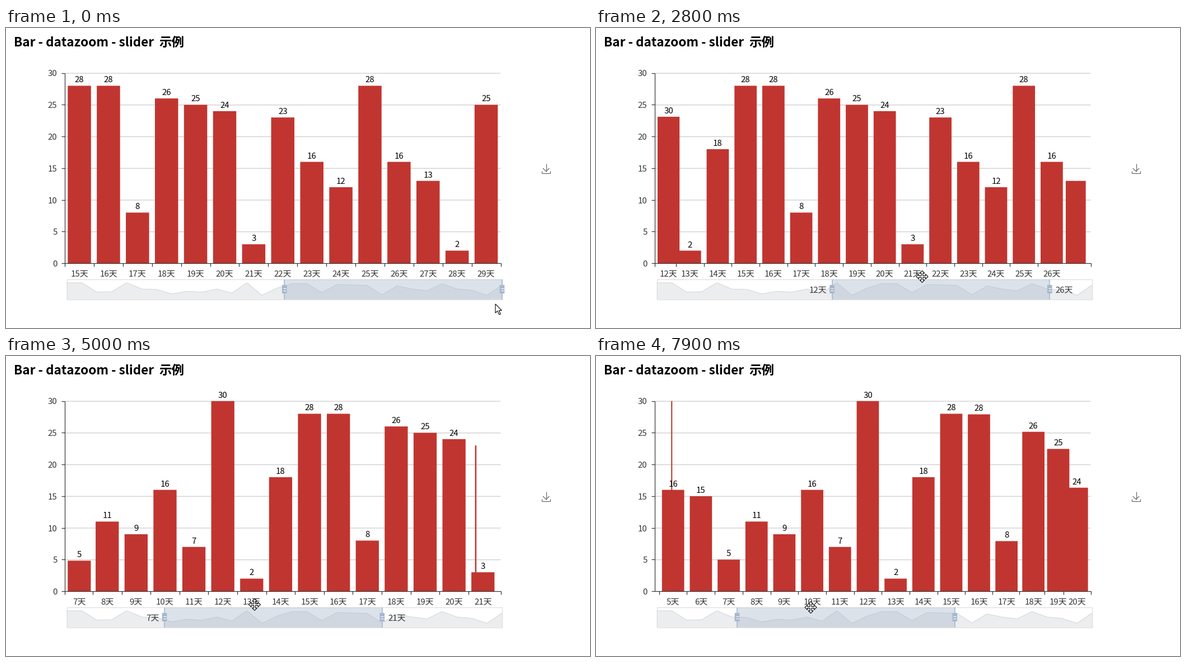
A matplotlib script for the animation above (8 s loop, 1043 px wide and 537 px high).

```python
import numpy as np
import matplotlib.pyplot as plt
from matplotlib.animation import FuncAnimation
from matplotlib.patches import Polygon, Rectangle

W, H, DPI = 1043, 537, 100
STEP, FRAMES = 100, 80
CJK = "Noto Sans CJK JP"
DARK, RED, HANDLE = "#333333", "#c13530", "#a7b7cc"

VALUES = [30, 30, 9, 10, 30, 16, 15, 5, 11, 9, 16, 7, 30, 2, 18,
          28, 28, 8, 26, 25, 24, 3, 23, 16, 12, 28, 16, 13, 2, 25]
LAST = len(VALUES) - 1
X0, X1, Y0, UNIT = 105.1, 883.5, 421.2, 11.35       # plot area
S0, S1, S_TOP, S_BOTTOM = 108.5, 886, 449.5, 485.5  # slider
SPAN = (S1 - S0) / 2
TWEEN = 300

# Key points of the drag: time in ms, left edge of the zoom window in px.
DRAG_T = [1800, 2200, 2600, 2800, 3900, 4200, 5000, 6200, 6950, 7250, 7750, 7900]
DRAG_X = [S0 + SPAN, 455.5, 443, 421.5, 365, 339, 283, 186, S0, S0, 241, 252]
# The chart follows the slider at a throttled rate, anew in each burst.
UPDATES = np.concatenate([np.arange(1910, 4400, 110),
                          np.arange(4420, 6000, 100),
                          np.arange(6095, 7900, 95)])


def slider_left(t):
    return np.interp(t, DRAG_T, DRAG_X)


def window(t):
    start = (slider_left(t) - S0) / (S1 - S0) * LAST
    return int(start + 0.5), int(start + LAST / 2 + 0.5)


def layout(first, last):
    """Category -> (centre, band width, value) at rest."""
    band = (X1 - X0) / (last - first + 1)
    return {i: np.array([X0 + (i - first + 0.5) * band, band, VALUES[i]])
            for i in range(first, last + 1)}


def cubic_out(p):
    return 1 - (1 - min(max(p, 0), 1)) ** 3


def blend(begin, goal, elapsed):
    p = cubic_out(elapsed / TWEEN)
    return {i: begin[i] + p * (goal[i] - begin[i]) for i in goal}


def chart_state(t):
    """Bars at time t, the removed bars still shrinking, and the window."""
    span = (LAST // 2 + 1, LAST)
    begin = goal = layout(*span)
    since, leaving = 0, []
    for u in UPDATES[UPDATES <= t]:
        now = blend(begin, goal, u - since)
        span, since = window(u), u
        goal = layout(*span)
        leaving += [(u, now[i]) for i in now if i not in goal]
        begin = {i: now.get(i, goal[i] * (1, 1, 0)) for i in goal}
    shrinking = []
    for u, (centre, band, value) in leaving:
        width = 0.8 * band * (1 - cubic_out((t - u) / TWEEN))
        if width > 0.02:
            shrinking.append((centre - 0.4 * band, width, value))
    return blend(begin, goal, t - since), shrinking, span


def cursor_at(t):
    if t < 1800:
        p = min(t / 900, 1)
        p = p * p * (3 - 2 * p)
        return 874 - 216 * p, 494 - 49 * p
    offset = np.interp(t, [6950, 7100], [161, 131.5])
    return slider_left(t) + offset, np.interp(t, [6950, 7300], [445, 450])


fig = plt.figure(figsize=(W / DPI, H / DPI), dpi=DPI, facecolor="white")
ax = fig.add_axes([0, 0, 1, 1])
ax.set(xlim=(0, W), ylim=(H, 0))
ax.axis("off")


def px(size):
    return size * 72 / DPI


def text(x, y, s, ha="center", color=DARK, size=15, z=5, **kw):
    return ax.text(x, y, s, ha=ha, va="baseline", color=color, zorder=z,
                   fontsize=px(size), family=CJK, **kw)


def line(xs, ys, color=DARK, width=1.2, z=4, **kw):
    return ax.plot(xs, ys, color=color, lw=px(width), zorder=z,
                   solid_capstyle="butt", solid_joinstyle="miter", **kw)[0]


def rect(x, y, w, h, color, z, edge="none", width=0.0, **kw):
    return ax.add_patch(Rectangle((x, y), w, h, fc=color, ec=edge,
                                  lw=px(width), zorder=z, **kw))


def shape(points, color, z, edge="none", width=0.0):
    return ax.add_patch(Polygon(points, fc=color, ec=edge, lw=px(width),
                                zorder=z, joinstyle="miter"))


def bar(x, width, value, z):
    return rect(x, Y0 - value * UNIT, width, value * UNIT, RED, z, snap=False)


def draw_download_icon(x, y):
    for xs, ys in [([0, 0], [-8.5, 5]),
                   ([-5.7, 0, 5.7], [-0.5, 5.2, -0.5]),
                   ([-7.5, -7.5, 7.5, 7.5], [4.5, 8.5, 8.5, 4.5])]:
        line(np.add(xs, x), np.add(ys, y), "#666666")


def draw_static():
    for x, s in [(14, "Bar - datazoom - slider"), (273, "示例")]:
        text(x, 33, s, "left", "black", 22.5, weight="bold")
    for value in range(0, 31, 5):
        y = Y0 - value * UNIT
        if value:
            line([X0, X1], [y + 0.3, y + 0.3], "#cccccc", 1.25, 1, snap=False)
        line([X0 - 6.5, X0], [y, y])
        text(X0 - 13.6, y + 5.8, str(value), "right")
    line([X0, X0], [Y0 - 30 * UNIT, Y0])
    line([X0, X1], [Y0, Y0])
    line([X1, X1], [Y0, Y0 + 6])
    draw_download_icon(964.5, 251.5)

    xs = np.linspace(S0, S1, len(VALUES))
    ys = 456 + 0.8 * (30 - np.array(VALUES))
    shape([(S0, S_BOTTOM), *zip(xs, ys), (S1, S_BOTTOM)], "#ecedef", 2)
    line(xs, ys, "#c9ced3", 0.8, z=2.1)
    rect(S0, S_TOP, S1 - S0, S_BOTTOM - S_TOP, "none", 2.2, "#dddddd", 1.2)


def draw_handle(x):
    parts = [line([x, x], [S_TOP, S_BOTTOM], HANDLE, 1.6, z=6),
             rect(x - 4.3, 460, 8.6, 15, HANDLE, 6.1, snap=False)]
    return parts + [line([x - 2.5, x + 2.5], [y, y], "white", 1.2, z=6.2)
                    for y in (465.5, 469.5)]


def draw_cursor(t):
    x, y = cursor_at(t)
    if y > S_BOTTOM:
        points = [(0, 0), (0, 16), (3.8, 12.6), (6.8, 19), (9.3, 18),
                  (6.4, 11.6), (11.4, 11.6)]
    else:
        arm = [(1.4, -1.4), (1.4, -6), (4.4, -6), (0, -10.5),
               (-4.4, -6), (-1.4, -6)]
        points = []
        for _ in range(4):
            points += arm
            arm = [(b, -a) for a, b in arm]
    return shape([(x + a, y + b) for a, b in points], "white", 9, "black", 1.1)


moving = []


def draw(frame):
    t = frame * STEP
    while moving:
        moving.pop().remove()

    bars, shrinking, (first, last) = chart_state(t)
    for x, width, value in shrinking:
        moving.append(bar(x, width, value, 2.5))
    for i, (centre, band, value) in bars.items():
        tick = centre - band / 2
        moving.extend([
            bar(centre - 0.4 * band, 0.8 * band, value, 3),
            line([tick, tick], [Y0, Y0 + 6]),
            text(centre, Y0 - value * UNIT - 6, str(VALUES[i]), color="black"),
            text(centre, 444.5, f"{i}天")])

    left = slider_left(t)
    right = left + SPAN
    moving.append(rect(left, S_TOP, SPAN, S_BOTTOM - S_TOP, HANDLE, 5.5,
                       alpha=0.4))
    moving.extend(draw_handle(left) + draw_handle(right))
    if 200 <= t < DRAG_T[-1]:  # shown while the pointer is on the slider
        moving.append(text(left - 9.5, 473.5, f"{first}天", "right", z=7))
        moving.append(text(right + 10.5, 473.5, f"{last}天", "left", z=7))
    moving.append(draw_cursor(t))
    return moving


draw_static()
anim = FuncAnimation(fig, draw, frames=FRAMES, interval=STEP,
                     init_func=lambda: [], repeat=True, repeat_delay=0)
plt.show()
```
